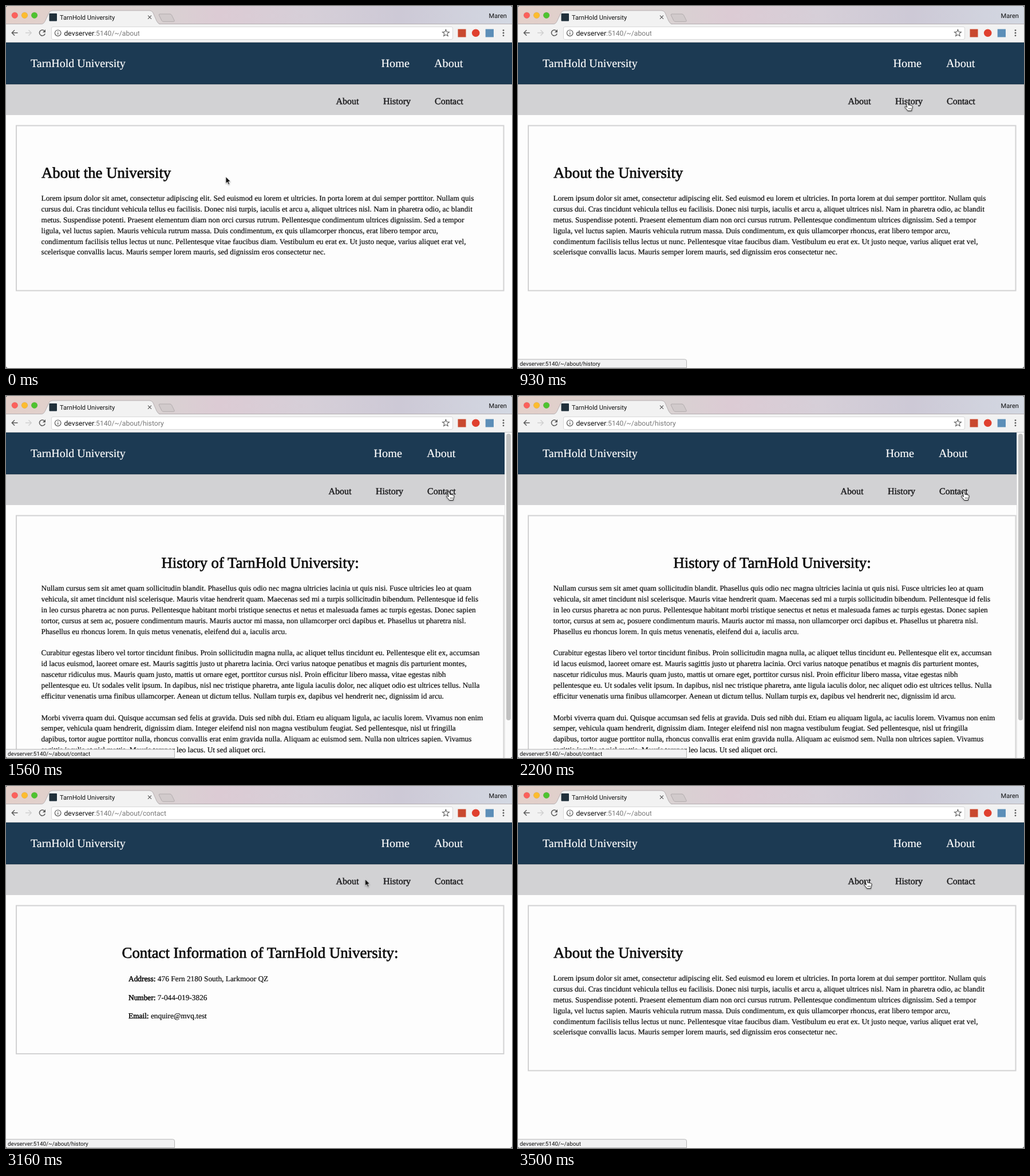
These frames come from a looping animation (884x634 px, 4860 ms). An HTML page:

```html
<!DOCTYPE html>
<html lang="en">
<head>
<meta charset="utf-8">
<title>TarnHold University</title>
<style>
  html, body { margin: 0; width: 100%; height: 100%; overflow: hidden; background: #555; }
  svg { display: block; width: 884px; height: 634px; border-radius: 4px; }
  text, p { text-rendering: geometricPrecision; }
  text { font-family: Roboto, "Open Sans", sans-serif; }

  .serif text, p { font-family: "Liberation Serif", "Times New Roman", serif; font-size: 13.35px; }
  .serif text { fill: #0c0c0c; stroke: #0c0c0c; stroke-width: .2; }
  p { margin: 0; white-space: pre; line-height: 18.87px; color: #0c0c0c; -webkit-text-stroke: .2px #0c0c0c; }
  .serif .title { font-size: 26.8px; stroke-width: .7; }
  .serif .main { font-size: 20.2px; fill: #fff; stroke: #fff; }
  .serif .sub { font-size: 16px; fill: #1c1c1e; stroke: #1c1c1e; stroke-width: .45; }
  .serif .label { stroke-width: .55; }
  .frame { fill: none; stroke: #d2d2d3; stroke-width: 2; }

  .tab { font-size: 11.1px; fill: #111; }
  .url { font-size: 12.2px; fill: #111; }
  .url .path { fill: #777; }
  .status { font-size: 9.85px; fill: #111; }
  .icon { fill: none; stroke: #5a5a5a; stroke-width: 1.5; }

  /* One loop is 4860 ms, so 1% is 48.6 ms. */
  .anim { animation: 4860ms step-end infinite; }
  .page-about { animation-name: page-about; }
  .page-history { animation-name: page-history; }
  .page-contact { animation-name: page-contact; }
  .url-about { animation-name: url-about; }
  .url-history { animation-name: url-history; }
  .nav { animation-name: nav; }
  .bubble { animation-name: bubble; }
  .tip-about { animation-name: tip-about; }
  .tip-history { animation-name: tip-history; }
  .tip-contact { animation-name: tip-contact; }
  .arrow { animation-name: arrow; }
  .hand { animation-name: hand; }
  .pointer { animation: pointer 4860ms linear infinite; filter: drop-shadow(0 1px 1px rgba(0, 0, 0, .35)); }

  @keyframes page-about { 0%, 71.91% { opacity: 1 } 23.77% { opacity: 0 } 100% { opacity: 1 } }
  @keyframes page-history { 0%, 47.22%, 100% { opacity: 0 } 23.77% { opacity: 1 } }
  @keyframes page-contact { 0%, 71.91%, 100% { opacity: 0 } 47.22% { opacity: 1 } }
  @keyframes url-about { 0%, 71.91%, 100% { opacity: 1 } 23.15% { opacity: 0 } }
  @keyframes url-history { 0%, 47.22%, 100% { opacity: 0 } 23.15% { opacity: 1 } }
  @keyframes nav { 0%, 47.22%, 100% { transform: none } 23.77% { transform: translateX(-13px) } }

  @keyframes bubble { 0% { opacity: 0 } 15.2%, 100% { opacity: 1 } }
  @keyframes tip-history { 0%, 30.97%, 65.53%, 100% { opacity: 0 } 15.2%, 57.6% { opacity: 1 } }
  @keyframes tip-contact { 0%, 57.6%, 100% { opacity: 0 } 30.97% { opacity: 1 } }
  @keyframes tip-about { 0% { opacity: 0 } 65.53%, 100% { opacity: 1 } }

  @keyframes arrow {
    0%, 29.84%, 56.4%, 64.1% { opacity: 1 }
    14.8%, 30.97%, 57.6%, 65.53%, 100% { opacity: 0 }
  }
  @keyframes hand {
    0%, 29.84%, 56.4%, 64.1% { opacity: 0 }
    14.8%, 30.97%, 57.6%, 65.53%, 100% { opacity: 1 }
  }
  @keyframes pointer {
    0% { transform: translate(384px, 299px) }
    2.2% { transform: translate(384px, 299px); animation-timing-function: ease-in-out }
    8.75%, 12.8% { transform: translate(718px, 175px); animation-timing-function: ease-in-out }
    19.5%, 28.6% { transform: translate(680px, 169px); animation-timing-function: ease-in-out }
    32.8% { transform: translate(779px, 168px); animation-timing-function: step-end }
    47.22%, 54.73% { transform: translate(775px, 167px); animation-timing-function: ease-in-out }
    60.8%, 63.4% { transform: translate(670px, 163px); animation-timing-function: ease-out }
    64.95% { transform: translate(628.5px, 163px); animation-timing-function: ease-out }
    67.5%, 100% { transform: translate(609px, 165px) }
  }
</style>
</head>
<body>
<svg viewBox="0 0 884 634" xmlns="http://www.w3.org/2000/svg">
  <defs>
    <linearGradient id="bar">
      <stop offset="0" stop-color="#e3cfc9"/>
      <stop offset=".3" stop-color="#d9d2d2"/>
      <stop offset=".42" stop-color="#dccbd4"/>
      <stop offset=".6" stop-color="#d6cfd8"/>
      <stop offset=".78" stop-color="#cdc9d6"/>
      <stop offset="1" stop-color="#d3d8e2"/>
    </linearGradient>
  </defs>

  <!-- Site -->
  <rect width="884" height="634" fill="#fdfdfd"/>
  <rect y="64" width="884" height="73" fill="#1c3a53"/>
  <rect y="136.5" width="884" height="1" fill="#142a3d"/>
  <rect y="137.5" width="884" height="53.5" fill="#d2d2d4"/>
  <g class="serif">
    <text class="main" x="43" y="107" style="font-size:20px">TarnHold University</text>
    <g class="anim nav">
      <text class="main" x="655.5" y="107">Home</text>
      <text class="main" x="748" y="107">About</text>
      <text class="sub" x="576.5" y="171.5">About</text>
      <text class="sub" x="659" y="171.5">History</text>
      <text class="sub" x="749" y="171.5">Contact</text>
    </g>

    <g class="anim page-about">
      <rect class="frame" x="18" y="209.5" width="851.5" height="289"/>
      <text class="title" x="62" y="301">About the University</text>
      <foreignObject x="61.5" y="328" width="800" height="150"><p>Lorem ipsum dolor sit amet, consectetur adipiscing elit. Sed euismod eu lorem et ultricies. In porta lorem at dui semper porttitor. Nullam quis
cursus dui. Cras tincidunt vehicula tellus eu facilisis. Donec nisi turpis, iaculis et arcu a, aliquet ultrices nisl. Nam in pharetra odio, ac blandit
metus. Suspendisse potenti. Praesent elementum diam non orci cursus rutrum. Pellentesque condimentum ultrices dignissim. Sed a tempor
ligula, vel luctus sapien. Mauris vehicula rutrum massa. Duis condimentum, ex quis ullamcorper rhoncus, erat libero tempor arcu,
condimentum facilisis tellus lectus ut nunc. Pellentesque vitae faucibus diam. Vestibulum eu erat ex. Ut justo neque, varius aliquet erat vel,
scelerisque convallis lacus. Mauris semper lorem mauris, sed dignissim eros consectetur nec.</p></foreignObject>
    </g>

    <g class="anim page-history">
      <rect class="frame" x="18" y="209.5" width="851.5" height="440"/>
      <text class="title" x="444" y="301" text-anchor="middle">History of TarnHold University:</text>
      <foreignObject x="61.5" y="328" width="800" height="306"><p>Nullam cursus sem sit amet quam sollicitudin blandit. Phasellus quis odio nec magna ultricies lacinia ut quis nisi. Fusce ultricies leo at quam
vehicula, sit amet tincidunt nisl scelerisque. Mauris vitae hendrerit quam. Maecenas sed mi a turpis sollicitudin bibendum. Pellentesque id felis
in leo cursus pharetra ac non purus. Pellentesque habitant morbi tristique senectus et netus et malesuada fames ac turpis egestas. Donec sapien
tortor, cursus at sem ac, posuere condimentum mauris. Mauris auctor mi massa, non ullamcorper orci dapibus et. Phasellus ut pharetra nisl.
Phasellus eu rhoncus lorem. In quis metus venenatis, eleifend dui a, iaculis arcu.

Curabitur egestas libero vel tortor tincidunt finibus. Proin sollicitudin magna nulla, ac aliquet tellus tincidunt eu. Pellentesque elit ex, accumsan
id lacus euismod, laoreet ornare est. Mauris sagittis justo ut pharetra lacinia. Orci varius natoque penatibus et magnis dis parturient montes,
nascetur ridiculus mus. Mauris quam justo, mattis ut ornare eget, porttitor cursus nisl. Proin efficitur libero massa, vitae egestas nibh
pellentesque eu. Ut sodales velit ipsum. In dapibus, nisl nec tristique pharetra, ante ligula iaculis dolor, nec aliquet odio est ultrices tellus. Nulla
efficitur venenatis urna finibus ullamcorper. Aenean ut dictum tellus. Nullam turpis ex, dapibus vel hendrerit nec, dignissim id arcu.

Morbi viverra quam dui. Quisque accumsan sed felis at gravida. Duis sed nibh dui. Etiam eu aliquam ligula, ac iaculis lorem. Vivamus non enim
semper, vehicula quam hendrerit, dignissim diam. Integer eleifend nisl non magna vestibulum feugiat. Sed pellentesque, nisl ut fringilla
dapibus, tortor augue porttitor nulla, rhoncus convallis erat enim gravida nulla. Aliquam ac euismod sem. Nulla non ultrices sapien. Vivamus
sagittis iaculis at nisl mattis. Mauris tempor leo lacus. Ut sed aliquet orci.</p></foreignObject>
      <rect x="871" y="64" width="13" height="570" fill="#fafafa"/>
      <path d="M871.5 64V634" stroke="#e6e6e6"/>
      <rect x="874" y="66" width="8" height="502" rx="4" fill="#c1c1c1"/>
    </g>

    <g class="anim page-contact">
      <rect class="frame" x="18" y="209.5" width="851.5" height="259.5"/>
      <text class="title" x="444" y="301" text-anchor="middle">Contact Information of TarnHold University:</text>
      <text x="214" y="342"><tspan class="label">Address:</tspan> 476 Fern 2180 South, Larkmoor QZ</text>
      <text x="214" y="374.5"><tspan class="label">Number:</tspan> 7-044-019-3826</text>
      <text x="214" y="407"><tspan class="label">Email:</tspan> enquire@mvq.test</text>
    </g>
  </g>

  <!-- Browser window -->
  <rect width="884" height="32" fill="url(#bar)"/>
  <path d="M0 31.5H884" stroke="#b5afb2"/>
  <g stroke="#000" stroke-opacity=".12" stroke-width=".6">
    <circle cx="15.3" cy="16.3" r="5.4" fill="#fc605b"/>
    <circle cx="32.5" cy="16.3" r="5.4" fill="#fdbc2e"/>
    <circle cx="49.6" cy="16.3" r="5.4" fill="#4fc32f"/>
  </g>
  <rect y="32" width="884" height="32" fill="#f2f2f2"/>
  <path d="M61 32C66 31 67 29 69 25L75 12Q77 8 81 8H251Q255 8 257 12L263 26Q266 32 270 32" fill="#f2f2f2" stroke="#aaa4a6" stroke-width=".8"/>
  <path d="M61 32H270V33H61Z" fill="#f2f2f2"/>
  <path d="M269 14H286Q288.5 14 289.5 16L294 25Q295 27.3 292.5 27.3H275Q273 27.3 272 25.5L267.3 16Q266.6 14 269 14Z" fill="#d1cacb" stroke="#a9a3a5" stroke-width=".8"/>
  <rect x="75.5" y="13" width="13.5" height="13.5" rx="1" fill="#20303b"/>
  <text class="tab" x="94" y="23.5">TarnHold University</text>
  <path class="icon" d="M248 16.7L254 22.7M254 16.7L248 22.7" style="stroke-width:1.2"/>
  <text class="tab" x="875" y="21" text-anchor="end">Maren</text>

  <path class="icon" d="M20.5 47H10.5M15 42.3L10.3 47L15 51.7"/>
  <path class="icon" d="M34 47H44M39.5 42.3L44.2 47L39.5 51.7" style="stroke:#d0d0d0"/>
  <path class="icon" d="M67 43.5A5 5 0 1 0 68.2 48.5"/>
  <path d="M69 41V46.2H63.8Z" fill="#5a5a5a"/>
  <rect x="79.5" y="36.5" width="701" height="22" rx="2.5" fill="#fff" stroke="#d8d8d8"/>
  <circle class="icon" cx="90.7" cy="47.3" r="5.3" style="stroke-width:1.2"/>
  <path class="icon" d="M90.7 46.5V50.3M90.7 44V45.3" style="stroke-width:1.3"/>
  <text class="url" x="101.5" y="51.7">devserver<tspan class="path">:5140/~/about<tspan class="anim"></tspan></tspan></text>
  <g class="url">
    <g class="anim url-about"><rect x="233" y="38" width="60" height="19" fill="#fff"/></g>
    <g class="anim url-history"><text class="url" x="101.5" y="51.7"><tspan fill="none">devserver</tspan><tspan fill="none">:5140/~/about</tspan><tspan class="path">/history</tspan></text></g>
    <g class="anim page-contact"><text class="url" x="101.5" y="51.7"><tspan fill="none">devserver</tspan><tspan fill="none">:5140/~/about</tspan><tspan class="path">/contact</tspan></text></g>
  </g>
  <path class="icon" d="M768.4 41.3L770 45.3L774.3 45.6L771 48.4L772.1 52.6L768.4 50.3L764.7 52.6L765.8 48.4L762.5 45.6L766.8 45.3Z" style="stroke-width:1.1"/>
  <rect x="789.5" y="40.5" width="14" height="14" fill="#c9492f"/>
  <circle cx="820.7" cy="47.3" r="6.8" fill="#e0402f"/>
  <rect x="837.7" y="40.5" width="14.3" height="14" fill="#5d8fb8"/>
  <g fill="#5a5a5a">
    <circle cx="869" cy="42.6" r="1.4"/><circle cx="869" cy="47.2" r="1.4"/><circle cx="869" cy="51.8" r="1.4"/>
  </g>
  <path d="M0 63.5H884" stroke="#c4c6c8"/>

  <!-- Link preview -->
  <g class="anim bubble">
    <path d="M-1 618.8H291.5Q294.5 618.8 294.5 621.8V633.5H-1Z" fill="#f1f1f2" stroke="#b4b4b4"/>
    <g class="anim tip-about"><text class="status" x="3" y="629.6">devserver:5140/~/about</text></g>
    <g class="anim tip-history"><text class="status" x="3" y="629.6">devserver:5140/~/about/history</text></g>
    <g class="anim tip-contact"><text class="status" x="3" y="629.6">devserver:5140/~/about/contact</text></g>
  </g>

  <g class="pointer">
    <path class="anim arrow" d="M0 0V11.8L2.8 9.3L4.7 13.8L6.7 12.9L4.8 8.6H8.4Z" fill="#111" stroke="#fff" stroke-width=".8"/>
    <g class="anim hand" stroke="#222" stroke-linejoin="round">
      <path d="M-2 1.2C-1.6-.6 .6-.6 1 1L2.2 5C3 4 4.6 4.2 4.8 5.2C5.8 4.4 7 4.8 7.2 5.8C8.4 5.2 9.2 6 9 7.4C8.8 10 8.2 11 7.6 12.4V14.5H.6C0 12.6-2.4 11-4 8.6C-5 7-3.4 6.2-2.2 7.2L-.6 8.6Z" fill="#fff"/>
      <path d="M2.4 9.5V12M4.3 9.5V12M6.1 9.5V12" stroke-width=".7"/>
    </g>
  </g>
</svg>
</body>
</html>
```
